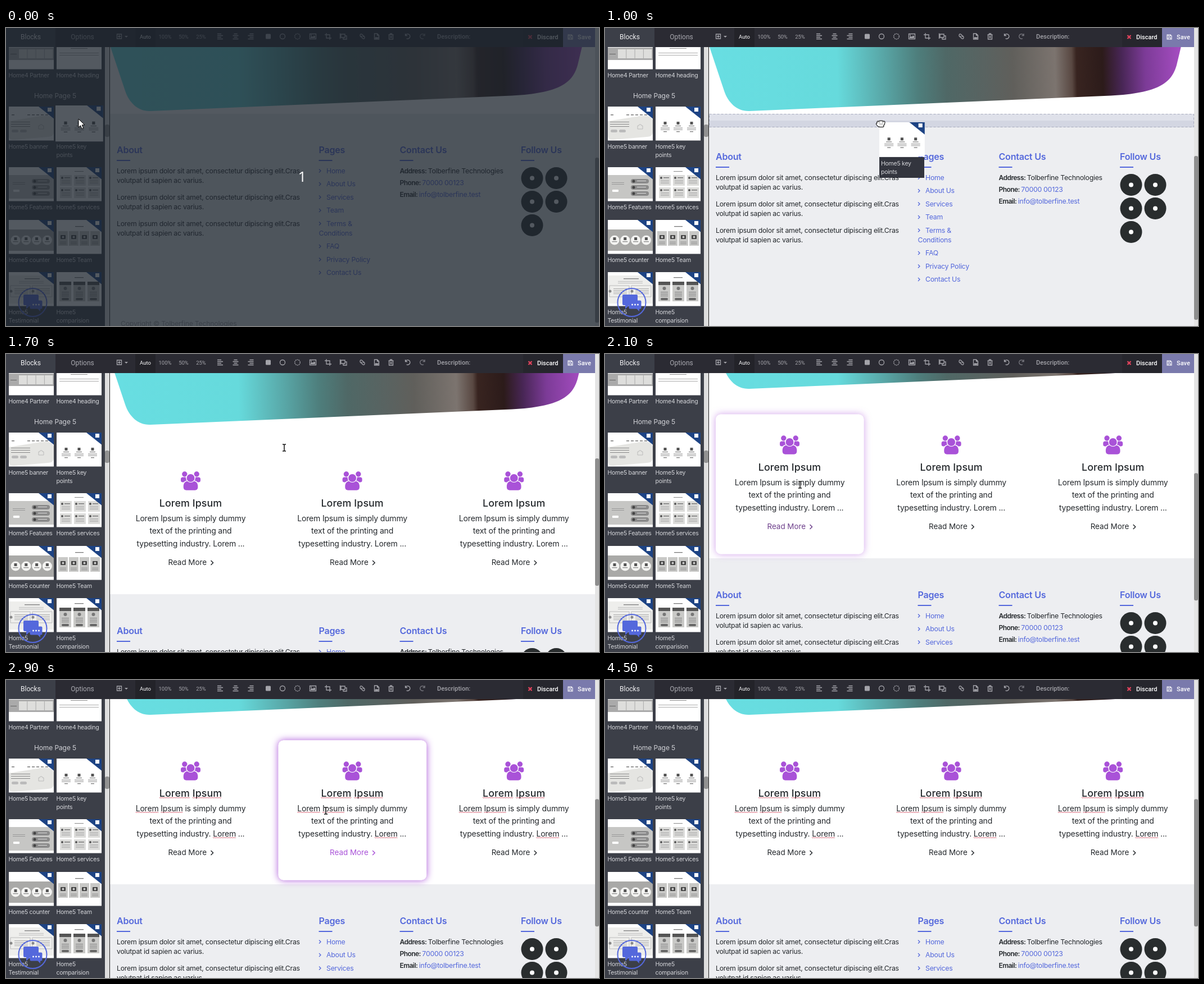
These frames come from a looping animation (1055 px wide and 531 px high, 5 s). An HTML page with a canvas:

```html
<!DOCTYPE html>
<html lang="en">
<head>
<meta charset="utf-8">
<title>Page builder: dragging a block</title>
<style>
html, body { margin: 0; width: 100%; height: 100%; overflow: hidden; }
canvas { display: block; }
</style>
</head>
<body>
<canvas id="stage" width="1055" height="531"></canvas>
<script>
const g = document.getElementById('stage').getContext('2d');
const LOOP = 5000, STEP = 100;
const BLUE = '#5468dc', PURPLE = '#a952d8', INK = '#24282c', GREY = '#a4a4aa';

// Text styles: size, weight, letter spacing, family
const LABEL = [10.5, 400, -.25, 'Inter'];
const GROUP = [12, 400, -.1, 'Inter'];
const PARA = [12.3, 400, -.25, 'Inter'];
const STRONG = [12, 600, -.55, 'Inter'];
const TITLE = [16, 600, -.2, 'Inter'];
const CARD_TITLE = [17.8, 500, .1, 'Inter'];
const CARD_TEXT = [14, 400, -.18, 'Inter'];
const MORE = [13.4, 400, 0, 'Inter'];
const TAB = [12, 400, 0, 'Roboto'];
const TOOL = [9.5, 400, 0, 'Roboto'];
const TOOL_BOLD = [11, 500, 0, 'Roboto'];
const COUNT = [26, 400, 0, 'Open Sans'];

// Tracks: time followed by values
const CURSOR = [[0, 129, 162], [399, 129, 162], [400, 133, 169], [500, 133, 169], [600, 150, 172],
  [1000, 491, 169], [1400, 492, 169], [1700, 495, 167], [1900, 495, 167], [2100, 347, 233],
  [2500, 350, 233], [2900, 569, 233], [3100, 580, 233], [3500, 860, 236], [3700, 860, 236],
  [3900, 750, 230], [4000, 750, 230], [4300, 205, 12]];
const SCROLL = [[1500, 0], [1600, 5], [1700, 22], [1800, 60], [1900, 86]];
const GLOW = [
  [[1900, 0], [2000, .25], [2100, .55], [2300, 1], [2600, 1], [2800, 0]],
  [[2600, 0], [2900, 1], [3200, 1], [3400, 0]],
  [[3200, 0], [3500, 1], [3700, 1], [3900, .4], [4000, .4], [4200, 0]]
];

function track(keys, t) {
  const i = keys.findIndex(k => k[0] > t);
  if (i === 0) return keys[0].slice(1);
  if (i < 0) return keys[keys.length - 1].slice(1);
  const a = keys[i - 1], b = keys[i], f = (t - a[0]) / (b[0] - a[0]);
  return a.slice(1).map((v, n) => v + (b[n + 1] - v) * f);
}

function rect(x, y, w, h, color, r = 0) {
  g.fillStyle = color;
  g.beginPath();
  g.roundRect(x, y, w, h, r);
  g.fill();
}

function disc(x, y, r, color) {
  g.fillStyle = color;
  g.beginPath();
  g.arc(x, y, r, 0, 7);
  g.fill();
}

function shape(x, y, d, fill, stroke, width = 1.3) {
  const p = new Path2D(d);
  g.save();
  g.translate(x, y);
  if (fill) { g.fillStyle = fill; g.fill(p); }
  if (stroke) { g.strokeStyle = stroke; g.lineWidth = width; g.stroke(p); }
  g.restore();
}

// y is the middle of the capitals; returns the advance width
function text(s, x, y, [size, weight, spacing, family], color, align = 'left') {
  g.font = `${weight} ${size}px "${family}", sans-serif`;
  g.letterSpacing = spacing + 'px';
  g.fillStyle = color;
  const w = g.measureText(s).width;
  g.fillText(s, align === 'center' ? x - w / 2 : x, y + size * .36);
  return w;
}

function squiggle(s, cx, y) {
  const left = cx - g.measureText(s).width / 2;
  g.strokeStyle = '#cf4a5e';
  g.lineWidth = .9;
  for (const m of s.matchAll(/Lorem|Ipsum/g)) {
    const x = left + g.measureText(s.slice(0, m.index)).width;
    const end = x + g.measureText(m[0]).width;
    g.beginPath();
    for (let i = 0; x + i * 1.5 < end; i++) g.lineTo(x + i * 1.5, y + (i % 2 ? 1.6 : 0));
    g.stroke();
  }
}

const lines = (x, y, w, n, gap, color = '#999') => {
  for (let i = 0; i < n; i++) rect(x, y + i * gap, w, 1, color);
};

const thumbs = {
  partner() {
    rect(0, 22, 80, 22, '#aaa');
    lines(3, 33, 11, 1, 3, '#666');
    for (let i = 0; i < 4; i++) rect(18 + i * 15.3, 25, 14.3, 16, '#dededc');
  },
  heading() {
    rect(25, 23, 30, 1, '#888');
    lines(5, 31, 70, 2, 4, '#aaa');
  },
  banner() {
    shape(0, 0, 'M0 26L56 17Q80 14 80 26V46Q80 53 70 54L10 59Q0 60 0 52Z', '#e5e5e2');
    for (let i = 0; i < 6; i++) rect(5 + i * 8 + (i > 0) * 20, 14, 5, 1.5, '#777');
    lines(4, 27, 34, 3, 4, '#888');
    rect(5, 41, 12, 5, '#bbb', 2.5);
    rect(20, 41, 12, 5, '#bbb', 2.5);
    shape(57, 36, 'M-4 -2H-2L-1 -4H2L3 -2H5V4H-4Z', null, '#bbb', 1);
  },
  points() {
    for (const x of [17, 40, 64]) {
      rect(x - 2.5, 27, 5, 5, '#555');
      rect(x - 5, 34, 10, 1, '#666');
      lines(x - 8, 37, 16, 3, 2, '#aaa');
      rect(x - 3, 44, 6, 1.3, '#777');
    }
  },
  features() {
    rect(0, 14, 80, 42, '#c6c6c4');
    lines(7, 27, 22, 2, 3, '#999');
    rect(8, 40, 11, 4, '#fff', 1);
    for (let i = 0; i < 3; i++) {
      rect(41, 21 + i * 11, 32, 8, '#8b8b8b', 4);
      disc(46, 25 + i * 11, 2.5, '#444');
      lines(52, 24 + i * 11, 16, 1, 2, '#ddd');
    }
  },
  services() {
    rect(32, 7, 16, 1, '#888');
    for (let i = 0; i < 6; i++) {
      const x = 6 + i % 3 * 25, y = 14 + (i > 2) * 22;
      rect(x, y, 21, 19, '#dcdcda');
      disc(x + 4, y + 5, 2, '#555');
      rect(x + 8, y + 4, 10, 1.5, '#777');
      lines(x + 3, y + 9, 15, 3, 2.5, '#aaa');
    }
  },
  counter() {
    rect(0, 17, 80, 38, '#a9a9a7');
    for (let i = 0; i < 4; i++) {
      disc(12 + i * 18.8, 36, 8.5, '#f4f4f2');
      rect(9.5 + i * 18.8, 31, 5, 5, '#555');
      rect(7.5 + i * 18.8, 38, 9, 1.3, '#888');
    }
  },
  team() {
    rect(33, 11, 15, 1.3, '#777');
    for (let i = 0; i < 4; i++) {
      const x = 3 + i * 19;
      rect(x, 20, 17, 26, '#c8c8c6');
      rect(x + 4, 27, 9, 7, '#444', 1);
      disc(x + 8.5, 30.5, 2, '#ccc');
      lines(x + 3, 39, 11, 2, 3, '#888');
    }
  },
  testimonial() {
    rect(0, 6, 80, 50, '#eeeeec');
    rect(28, 11, 27, 1.5, '#888');
    lines(18, 16, 44, 2, 3, '#bbb');
    for (const x of [3, 42]) {
      shape(x, 24, 'M0 0H35V20H0Z', null, '#bbb', 1);
      disc(x + 1, 34, 2.5, '#888');
      lines(x + 7, 29, 24, 4, 3, '#aaa');
    }
  },
  comparison() {
    rect(32, 9, 16, 1.3, '#777');
    for (let i = 0; i < 3; i++) {
      const x = 5 + i * 25;
      rect(x, 17, 21, 35, '#c9c9c7');
      rect(x, 17, 21, 6, '#555');
      disc(x + 10.5, 29, 3, '#777');
      lines(x + 4, 35, 13, 4, 2.5, '#888');
      rect(x + 4, 46, 13, 4, '#666', 2);
    }
  }
};

function thumb(kind, x, y, scale = 1, ribbon = true) {
  g.save();
  g.translate(x, y);
  g.scale(scale, scale);
  rect(0, 0, 80, 60.5, '#fff');
  thumbs[kind]();
  if (ribbon) {
    shape(0, 0, 'M53 0H80V21.5Z', '#1d4384');
    rect(69, 2, 7, 7, '#fff');
  }
  g.restore();
}

const blocks = [
  ['partner', 5, 13, 'Home4 Partner'], ['heading', 90, 13, 'Home4 heading'],
  ['banner', 5, 140, 'Home5 banner'], ['points', 90, 140, 'Home5 key|points'],
  ['features', 5, 248, 'Home5 Features'], ['services', 90, 248, 'Home5 services'],
  ['counter', 5, 342, 'Home5 counter'], ['team', 90, 342, 'Home5 Team'],
  ['testimonial', 5, 435, 'Home5|Testimonial'], ['comparison', 90, 435, 'Home5|comparision']
];

const label = (s, x, y) => s.split('|').forEach((part, i) => text(part, x, y + i * 14.5, LABEL, '#d5d6da'));

function sidebar(hover) {
  rect(0, 34, 176, 497, '#3c3f48');
  for (const [kind, x, y, name] of blocks) {
    const big = hover && kind === 'points';
    thumb(kind, big ? 88 : x, big ? 138 : y, big ? 1.06 : 1, y > 100);
    label(name, x - .5, y + 71.5);
  }
  text('Home Page 5', 87.5, 120.5, GROUP, '#d0d1d6', 'center');
  g.strokeStyle = BLUE;
  g.lineWidth = 2;
  g.beginPath();
  g.arc(47.5, 489, 25, 0, 7);
  g.stroke();
  rect(31, 475, 27, 19, BLUE, 2);
  shape(36, 493, 'M0 0V8L8 0Z', BLUE);
  rect(42.5, 485.5, 22, 15, BLUE, 2);
  shape(55, 499, 'M0 0L6 6V0Z', BLUE);
  for (const x of [48.5, 53.5, 58.5]) disc(x, 493, 1.4, '#fff');
  rect(176, 34, 8, 497, '#dedede');
  rect(176, 172, 8, 22, '#929292', 3);
  rect(184, 34, 1, 497, '#222');
}

function toolbar() {
  rect(0, 0, 1048, 34, '#2b2b33');
  rect(0, 0, 88, 34, '#3c3f48');
  text('Blocks', 44, 15.5, TAB, '#f0f0f2', 'center');
  text('Options', 136, 15.5, TAB, '#a9a9b0', 'center');
  rect(230, 0, 36, 34, '#232329');
  text('Auto', 248, 15.5, TOOL, '#fff', 'center');
  [['100%', 283], ['50%', 316], ['25%', 347]].forEach(([s, x]) => text(s, x, 15.5, TOOL, GREY, 'center'));
  const line = (x, d) => shape(x, 15, d, null, GREY);
  line(201.5, 'M-4 -4H4V4H-4ZM-2.5 0H2.5M0 -2.5V2.5');
  shape(214, 15, 'M-3 -1H3L0 2Z', GREY);
  line(381, 'M-5 -4.5H2M-5 -1.5H5M-5 1.5H2M-5 4.5H5');
  line(408.5, 'M-3 -4.5H3M-5 -1.5H5M-3 1.5H3M-5 4.5H5');
  line(435.5, 'M-2 -4.5H5M-5 -1.5H5M-2 1.5H5M-5 4.5H5');
  rect(462, 10.5, 9, 9, GREY, 1.5);
  line(492, 'M4.5 0A4.5 4.5 0 1 1 -4.5 0A4.5 4.5 0 1 1 4.5 0');
  g.setLineDash([2, 1]);
  line(518.5, 'M4.8 0A4.8 4.8 0 1 1 -4.8 0A4.8 4.8 0 1 1 4.8 0');
  g.setLineDash([]);
  line(546, 'M-5.5 -4.5H5.5V4.5H-5.5Z');
  shape(546, 15, 'M-4 3V1L-2 -1L0 1L2 -2L4 0V3ZM-4 -3H-2V-1.5H-4Z', GREY);
  line(573, 'M-3 -6V3H6M-6 -3H3V6');
  line(601, 'M-5 -4H2V2H-5ZM-1 2V5H5V-1H2M-6.5 -5.5V4');
  line(634, 'M-1 1Q-4 1 -4 -2Q-4 -5 -1 -4L1 -2Q2 0 1 1M1 -1Q4 -1 4 2Q4 5 1 4L-1 2Q-2 0 -1 -1');
  line(659.5, 'M-4 -5H1L4 -2V5H-4ZM1 -5V-2H4');
  shape(659.5, 15, 'M-3 4V2L-1 1L1 2L3 0V4Z', GREY);
  line(685, 'M-4.5 -3H4.5M-1.5 -3V-5H1.5V-3M-3.5 -3V5H3.5V-3M-1 -1V3M1 -1V3');
  line(715, 'M-4.5 -5V-1.5H-1M-4.3 -2A4.3 4.3 0 1 1 -2.5 3.7');
  shape(740.5, 15, 'M4.5 -5V-1.5H1M4.3 -2A4.3 4.3 0 1 0 2.5 3.7', null, '#77777e');
  text('Description:', 767, 15, TOOL_BOLD, GREY);
  rect(920, 0, 71, 34, '#26262d');
  shape(932.5, 16, 'M-3 -3L3 3M3 -3L-3 3', null, '#e0435c', 2.4);
  text('Discard', 945, 16, TOOL_BOLD, '#fff');
  rect(991, 0, 57, 34, '#7a7aac');
  shape(1004, 16, 'M-4 -4H2L4 -2V4H-4ZM-2 -4V-1.5H1.5V-4M-2 4V1H2V4', null, '#fff', 1.1);
  text('Save', 1017, 16, TOOL_BOLD, '#fff');
}

function hero() {
  const paint = g.createLinearGradient(185, 60, 1028, 40);
  [[0, '#68dee2'], [.27, '#66dadc'], [.37, '#58a5a5'], [.44, '#4e7e7c'], [.5, '#4f6866'], [.58, '#596361'],
    [.64, '#605f5b'], [.73, '#7c746f'], [.765, '#594842'], [.775, '#382420'], [.83, '#2c1b1a'],
    [.87, '#482655'], [.92, '#7c3b97'], [1, '#a84ec4']].forEach(s => paint.addColorStop(...s));
  shape(0, 0, 'M180 16L212 112C219 133 235 149 257 148L900 120.5C985 116 1008 98 1017 66L1028 20Z', paint);
}

function footer(top, base) {
  rect(185, top, 863, 531, '#edeef1');
  g.save();
  g.translate(0, base);
  [['About', 197], ['Pages', 556.5], ['Contact Us', 700.5], ['Follow Us', 916]].forEach(([s, x]) => {
    text(s, x, 65.5, TITLE, BLUE);
    rect(x, 83, 24, 2, BLUE);
  });
  for (let i = 0; i < 3; i++) {
    text('Lorem ipsum dolor sit amet, consectetur dipiscing elit.Cras', 197, 102.5 + i * 47, PARA, INK);
    text('volutpat id sapien ac varius.', 197, 119.5 + i * 47, PARA, INK);
  }
  ['Home', 'About Us', 'Services', 'Team', 'Terms &', 'FAQ', 'Privacy Policy', 'Contact Us'].forEach((s, i) => {
    const y = 102.5 + i * 23.5 + (i > 4 ? 17 : 0);
    shape(558.5, y, 'M-1.5 -3L1.5 0L-1.5 3', null, BLUE);
    text(s, 570, y, PARA, BLUE);
  });
  text('Conditions', 556.5, 213.5, PARA, BLUE);
  [['Address:', 'Tolberfine Technologies', INK], ['Phone:', '70000 00123', BLUE],
    ['Email:', 'info@tolberfine.test', BLUE]].forEach(([name, value, color], i) => {
    const y = 102.5 + i * 21;
    text(value, 703 + text(name, 700.5, y, STRONG, INK), y, PARA, color);
  });
  for (let i = 0; i < 5; i++) {
    const x = 936 + i % 2 * 43, y = 115.5 + (i >> 1) * 42;
    disc(x, y, 19.5, '#292d2e');
    disc(x, y, 4, '#fff');
  }
  text('Copyright © Tolberfine Technologies', 204, 375, PARA, '#97989b');
  g.restore();
}

function people(x, y) {
  for (const s of [-1, 1]) {
    disc(x + s * 10.7, y - 12, 4.7, PURPLE);
    rect(x + s * 12 - 5.5, y - 6.5, 11, 9, PURPLE, 3.5);
  }
  rect(x - 14, y - .5, 28, 17.5, '#fff', 8);
  disc(x, y - 5, 8.4, '#fff');
  rect(x - 12.8, y + .5, 25.6, 16.3, PURPLE, [8, 8, 5, 5]);
  disc(x, y - 5, 8, '#fff');
  disc(x, y - 5, 7, PURPLE);
}

function card(i, glow, checked) {
  const x = 328.5 + i * 287.6;
  if (glow > 0) {
    g.save();
    g.globalAlpha = glow;
    g.shadowColor = PURPLE;
    g.shadowBlur = 13;
    rect(x - 131.5, 107.5, 263.5, 249, '#fff', 9);
    g.restore();
    rect(x - 131.5, 107.5, 263.5, 249, '#fff', 9);
  }
  people(x, 162);
  const rows = ['Lorem Ipsum is simply dummy', 'text of the printing and', 'typesetting industry. Lorem ...'];
  const row = (s, y, style, drop) => {
    text(s, x, y, style, INK, 'center');
    if (checked) squiggle(s, x, y + drop);
  };
  row('Lorem Ipsum', 201.5, CARD_TITLE, 7.5);
  rows.forEach((s, n) => row(s, 228.5 + n * 22.6, CARD_TEXT, 6.5));
  const mix = [36, 40, 44].map((v, n) => v + ([169, 82, 216][n] - v) * glow);
  const color = `rgb(${mix})`;
  text('Read More', x - 40, 307.5, MORE, color);
  shape(x + 38, 308, 'M-2 -4L2 0L-2 4', null, color, 1.5);
}

function hand(x, y, reach) {
  const d = `M-4.5 2L-5 ${1 - reach}M-1.5 1V${-reach}M1.5 1V${-reach}M4.5 2L5 ${1 - reach}M-4 5L-6.5 2M-3 4H3M-2 5.5H3`;
  g.lineCap = 'round';
  shape(x, y, d, null, '#000', 5);
  shape(x, y, d, null, '#fff', 2.9);
  g.lineCap = 'butt';
}

function cursor(t) {
  if (t >= 4500) return;
  const [x, y] = track(CURSOR, t);
  if (t < 400 || t >= 4200) shape(x, y, 'M0 0V15L3.6 11.8L6 17.5L8.6 16.4L6.2 10.8H11Z', '#fff', '#000', 1);
  else if (t < 600) hand(x, y, 5);
  else if (t < 1400) hand(x, y, 2);
  else {
    const beam = 'M-3 -6H-1L0 -5L1 -6H3M0 -5V5M-3 6H-1L0 5L1 6H3';
    shape(x, y, beam, null, '#fff', 3);
    shape(x, y, beam, null, '#111', 1.5);
  }
}

function dropZone() {
  rect(185, 153, 863, 12, '#dfe1ea');
  rect(185, 165, 863, 12, '#d3d6e2');
  g.setLineDash([4, 3]);
  shape(185.5, 153.5, 'M0 0H862V23H0Z', null, '#a7abbd', 1);
  g.setLineDash([]);
}

function draw(t) {
  const dragging = t >= 600 && t < 1400, dropped = t >= 1400;
  const [scroll] = track(SCROLL, t);
  rect(0, 0, 1055, 531, '#fff');
  g.save();
  g.translate(0, -scroll);
  hero();
  g.restore();
  if (dropped) {
    footer(450 - scroll, 450 - scroll);
    g.save();
    g.translate(0, 86 - scroll);
    GLOW.forEach((keys, i) => card(i, track(keys, t)[0], t >= 2300));
    g.restore();
  } else footer(153, dragging ? 164 : 152);
  if (dragging) dropZone();

  rect(1048, 0, 7, 531, '#e4e4e4');
  const [barY, barH] = dropped ? [177 + scroll * .41, 227] : dragging ? [228, 292] : [231, 294];
  rect(1048, barY, 7, barH, '#8e8e8e', 3);
  sidebar(t < 600);
  toolbar();

  if (dragging) {
    const [x, y] = track(CURSOR, t);
    thumb('points', x - 3, y - 1, 1.01);
    rect(x - 3, y + 61, 80, 37, '#33353e');
    label('Home5 key|points', x, y + 72.5);
  }
  if (t < 400) {
    rect(0, 0, 1055, 531, 'rgba(30, 38, 46, .76)');
    text('1', 527, 265, COUNT, '#fff', 'center');
  }
  cursor(t);
}

function frame(now) {
  draw(Math.floor(now % LOOP / STEP) * STEP);
  requestAnimationFrame(frame);
}
requestAnimationFrame(frame);
</script>
</body>
</html>
```
